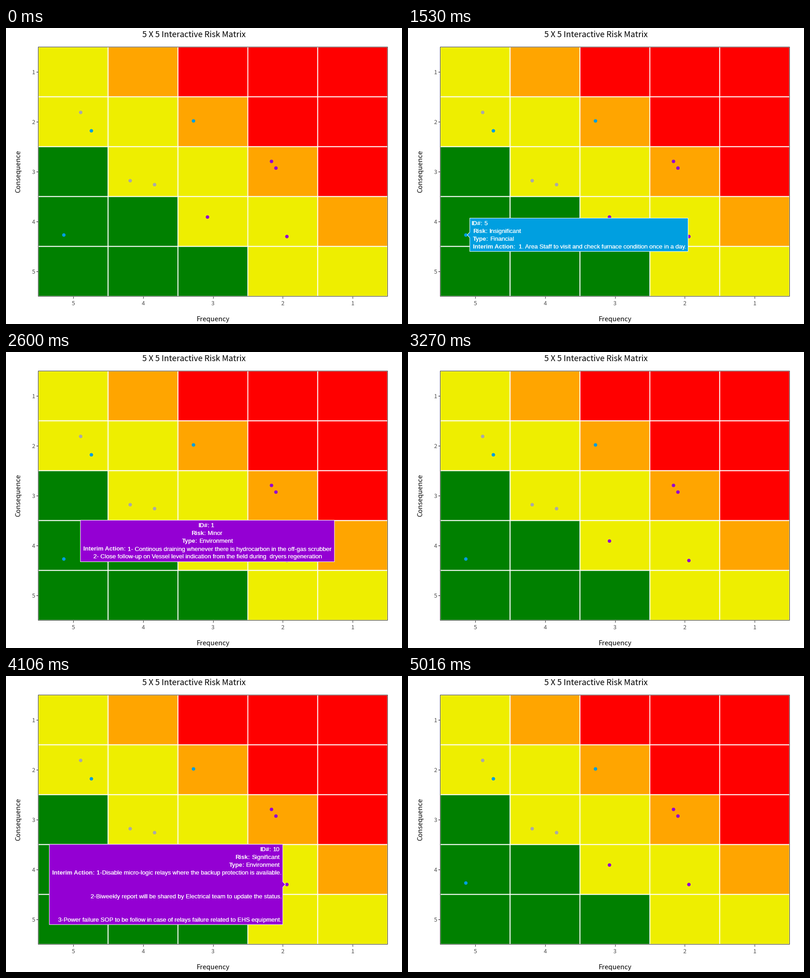
These frames come from a looping animation (866x647 px, 5.34 s). A matplotlib script:

```python
import matplotlib.pyplot as plt
from matplotlib.animation import FuncAnimation
from matplotlib.patches import Circle, Polygon, Rectangle

W, H, DPI = 866, 647, 100
STEP, LOOP = 30, 5340

LEFT, TOP, RIGHT, BOTTOM = 70.5, 41.5, 834.5, 586.5
CELL_W, CELL_H = (RIGHT - LEFT) / 5, (BOTTOM - TOP) / 5

YELLOW, ORANGE, RED, GREEN = "#eeee00", "#ffa500", "#ff0000", "#008000"
BLUE, PURPLE, GREY, INK = "#009fe0", "#9400d3", "#a9a9a9", "#333333"

LABEL_FONT = "Noto Sans CJK JP"
TIP_FONT = "Liberation Sans"

fig = plt.figure(figsize=(W / DPI, H / DPI), dpi=DPI, facecolor="white")
ax = fig.add_axes([0, 0, 1, 1])
ax.set_xlim(0, W)
ax.set_ylim(H, 0)
ax.axis("off")


def pt(px):
    return px * 72 / DPI


def label(x, y, text, size, color="black", **kw):
    kw.setdefault("ha", "center")
    kw.setdefault("family", LABEL_FONT)
    return ax.text(x, y, text, fontsize=pt(size), color=color,
                   va="baseline", **kw)


def line(x0, y0, x1, y1):
    ax.plot([x0, x1], [y0, y1], color=INK, lw=pt(1.2), solid_capstyle="butt")


def risk_color(row, col):
    level = col - row
    if level >= 2:
        return RED
    if level == 1:
        return ORANGE
    return YELLOW if level >= -1 else GREEN


def draw_matrix():
    panel = Rectangle((LEFT, TOP), RIGHT - LEFT, BOTTOM - TOP, fc="none",
                      ec=INK, lw=pt(1), snap=False, zorder=3)
    ax.add_patch(panel)
    for row in range(5):
        for col in range(5):
            tile = Rectangle((LEFT + col * CELL_W, TOP + row * CELL_H),
                             CELL_W, CELL_H, fc=risk_color(row, col),
                             ec="white", lw=pt(1.9), snap=False, zorder=1)
            ax.add_patch(tile)
            tile.set_clip_path(panel)


def draw_axes():
    for i in range(5):
        x = LEFT + (i + 0.5) * CELL_W
        y = TOP + (i + 0.5) * CELL_H
        line(x, BOTTOM + 0.5, x, BOTTOM + 4.5)
        line(LEFT - 4.5, y, LEFT - 0.5, y)
        label(x, 605.8, str(5 - i), 12.6, "#4d4d4d")
        label(63.5, y + 4.9, str(i + 1), 12.6, "#4d4d4d", ha="right")
    label(411.2, 19.5, "5 X 5 Interactive Risk Matrix", 17.9)
    label(453, 641, "Frequency", 14.7)
    label(31.3, 314, "Consequence", 14.8, rotation=90, rotation_mode="anchor")


def draw_points():
    groups = {
        GREY: [(163.3, 184.5), (271.6, 333.8), (324.9, 342.4)],
        BLUE: [(186.7, 224.7), (410, 203.1), (126.5, 452.5)],
        PURPLE: [(580.6, 291.6), (590.3, 306.2), (440.6, 413.2), (614.3, 455.8)],
    }
    for color, spots in groups.items():
        for spot in spots:
            ax.add_patch(Circle(spot, 3.8, fc=color, ec="none", zorder=4))


def tooltip(box, color, rows, arrow=None):
    """Box is x0, y0, x1, y1; rows are (y, bold x, bold text, x, text)."""
    x0, y0, x1, y1 = box
    outline = [(x0, y0), (x1, y0), (x1, y1), (x0, y1)]
    if arrow:
        tip_x, tip_y = arrow
        if tip_x < x0:
            outline += [(x0, tip_y + 6), arrow, (x0, tip_y - 6)]
        else:
            outline[2:2] = [(x1, tip_y - 6), arrow, (x1, tip_y + 6)]
    parts = [ax.add_patch(Polygon(outline, closed=True, fc=color, ec="white",
                                  lw=pt(1), joinstyle="miter", snap=False,
                                  zorder=6))]
    style = dict(size=13.24, color="white", family=TIP_FONT, ha="left", zorder=7)
    for y, bold_x, bold, x, text in rows:
        if bold:
            parts.append(label(bold_x, y, bold, weight="bold", **style))
        # Two passes give the thin strokes their full brightness.
        parts += [label(x, y, text, **style) for _ in range(2)]
    return parts


draw_matrix()
draw_axes()
draw_points()

financial = tooltip((135, 415.6, 612.5, 488.4), BLUE, [
    (431, 138, "ID#:", 166.5, "5"),
    (448, 141.7, "Risk:", 177.5, "Insignificant"),
    (465, 141.7, "Type:", 179.8, "Financial"),
    (482, 141.7, "Interim Action:", 241.9,
     "1. Area Staff to visit and check furnace condition once in a day."),
], arrow=(129.3, 452.3))

minor = tooltip((162.7, 367.7, 718.2, 458.5), PURPLE, [
    (383, 420, "ID#:", 448.3, "1"),
    (400, 405, "Risk:", 440.9, "Minor"),
    (417, 385.2, "Type:", 422.5, "Environment"),
    (434.5, 169, "Interim Action:", 265.8,
     "1- Continous draining whenever there is hydrocarbon"
     " in the off-gas scrubber"),
    (451.5, 0, "", 190.9,
     "2- Close follow-up on Vessel level indication from the field"
     " during  dryers regeneration"),
])

significant = tooltip((94.7, 367.9, 605.2, 543.4), PURPLE, [
    (383, 554.8, "ID#:", 583.7, "10"),
    (400, 501.4, "Risk:", 537.4, "Significant"),
    (417, 487.4, "Type:", 524.6, "Environment"),
    (434, 101, "Interim Action:", 198,
     "1-Disable micro-logic relays where the backup protection is available."),
    (486, 0, "", 184.9,
     "2-Biweekly report will be shared by Electrical team"
     " to update the status."),
    (537, 0, "", 114.5,
     "3-Power failure SOP to be follow in case of relays failure"
     " related to EHS equipment."),
], arrow=(611, 455.6))

# Each tooltip with the span of time it is shown, in ms.
HOVERS = [(1530, 2130, financial), (2600, 3270, minor), (3470, 4530, significant)]


def update(n):
    t = n * STEP + 20
    changed = []
    for start, end, parts in HOVERS:
        for part in parts:
            part.set_visible(start <= t < end)
        changed += parts
    return changed


anim = FuncAnimation(fig, update, frames=LOOP // STEP, interval=STEP,
                     init_func=lambda: update(0), repeat=True,
                     repeat_delay=0, blit=False)
plt.show()
```
